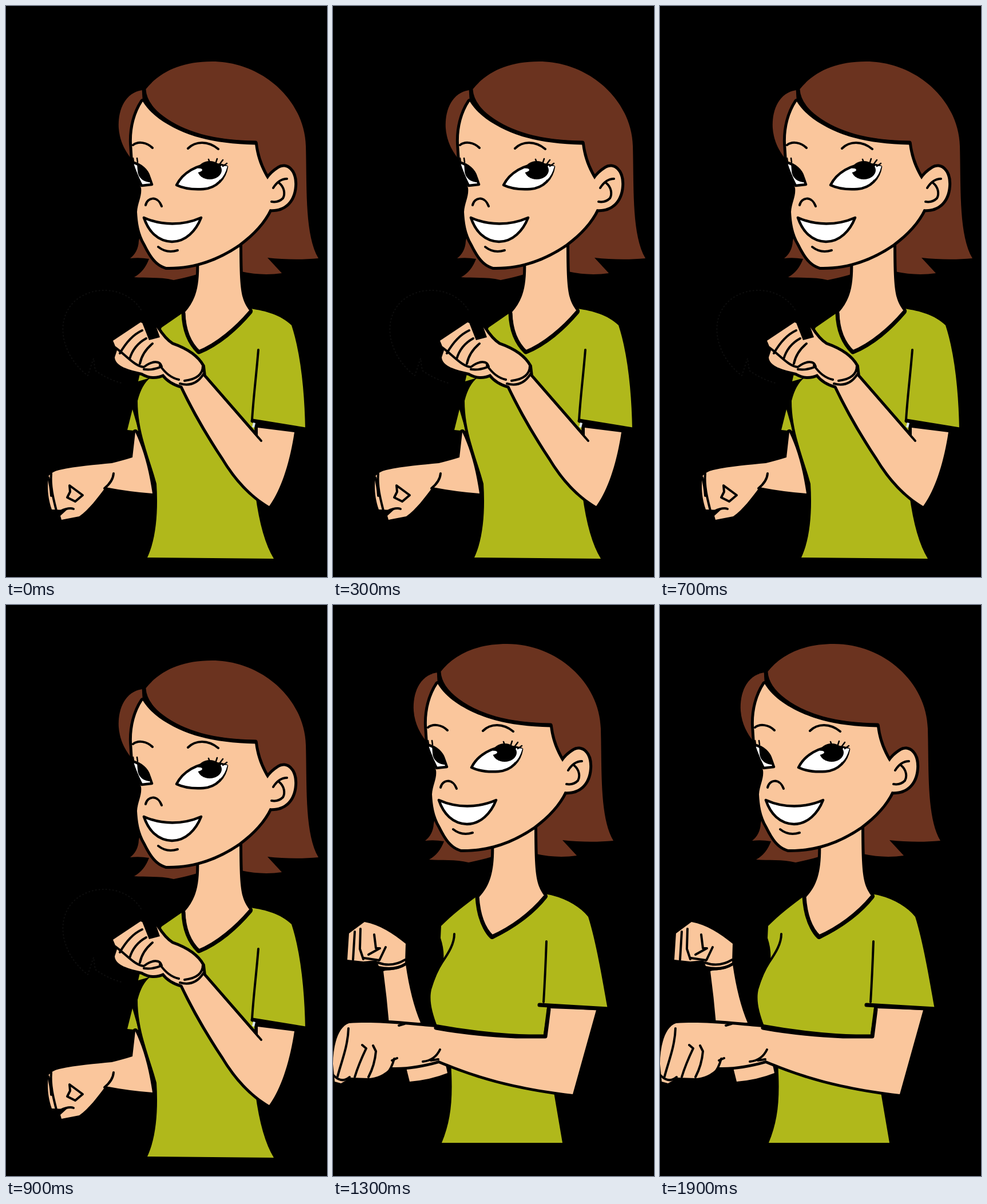
These frames come from a looping animation (561x998 px, 2 s). An HTML page:

```html
<!DOCTYPE html>
<html lang="en">
<head>
<meta charset="utf-8">
<title>Two poses</title>
<style>
  html, body { margin: 0; width: 100%; height: 100%; overflow: hidden; background: #000; }
  svg { display: block; width: 100%; height: 100%; }
  path, ellipse { stroke-linecap: round; stroke-linejoin: round; }
  .skin, .hair, .shirt { stroke: #000; stroke-width: 10; paint-order: stroke; }
  .skin { fill: #fac69c; }
  .hair { fill: #6b331f; }
  .shirt { fill: #b0b81b; }
  .white { fill: #fff; stroke: #000; stroke-width: 4.5; }
  .line { fill: none; stroke: #000; stroke-width: 4; }
  .bold { stroke-width: 7; }
  .thin { stroke-width: 2.5; }
  .faint { fill: none; stroke: #0e0e0e; stroke-width: 2; stroke-dasharray: 1 5; }
</style>
</head>
<body>
<svg viewBox="0 0 561 998">
  <defs>
    <g id="backHair">
      <path class="hair" d="M238 147C206 152 195 185 197 214C199 238 209 254 218 266L230 240L239 168Z"/>
      <path class="hair" d="M243 147C267 116 305 97 360 97C447 97 522 164 524 245C526 320 522 400 546 441C515 444 485 443 457 440Q470 454 482 467Q447 472 411 464L405 300L250 330L232 411Q231 430 217 441Q233 439 250 442Q242 464 224 474C245 476 270 473 293 479Q318 474 337 468L400 420L300 300L246 200Z"/>
    </g>
    <g id="face">
      <path class="skin" d="M239 167C225 188 219 215 220 240L222 272C225 286 231 302 236 318C238 332 230 344 229 360C230 377 232 397 244 417C255 439 264 451 280 456C330 457 370 441 407 416C432 397 450 378 461 355C484 357 502 343 504 315C506 287 489 276 477 284Q464 292 457 303C446 285 438 266 435 241C390 240 350 234 320 224C285 211 256 194 239 167Z"/>
      <path class="line bold" d="M241 146C243 184 293 214 340 227Q380 238 436 239"/>
      <path class="line" d="M222 243C231 236 246 238 256 248M318 249C331 236 353 235 371 250"/>
      <path class="white" d="M220 273C237 277 247 288 250 298L255 312L237 314Q227 295 220 273Z"/>
      <path d="M229 275C243 280 249 293 255 308C243 309 231 302 230 288Z"/>
      <path class="line thin" d="M223 272L222 266M230 273L229 266"/>
      <path class="white" d="M298 313C309 291 335 276 360 277Q379 277 386 281C383 301 369 318 345 320Q317 322 298 313Z"/>
      <path fill="#fff" d="M376 279L387 280Q383 296 374 304Z"/>
      <ellipse cx="356" cy="287" rx="21" ry="16"/>
      <path fill="#fff" d="M334 284Q343 283 343 287Q341 290 334 291Z"/>
      <path class="line thin" d="M357 276L354 268M366 276L369 267M373 277L379 269M379 280L386 275"/>
      <path class="line" d="M244 348C247 334 265 331 272 350"/>
      <path class="white" d="M241 370C272 384 309 384 341 370C332 393 314 412 290 412C265 411 249 394 241 370Z"/>
      <path class="line" d="M266 421Q281 433 300 427M467 318Q477 302 491 302M477 309C487 317 488 329 484 336Q476 344 464 342"/>
    </g>
  </defs>

  <g id="poseA">
    <path class="faint" d="M236 531C213 493 155 485 120 516C83 551 99 613 143 646L153 616L156 637Q178 653 205 660"/>
    <use href="#backHair"/>
    <path class="shirt" d="M221 705L212 741L232 743Z"/>
    <path class="skin" d="M226 745C240 774 250 810 256 852Q215 849 174 841C160 860 145 880 128 892L97 898L95 891L106 881L80 880C73 860 72 842 74 822Q80 814 93 811C125 804 155 802 185 799Q205 794 221 789Z"/>
    <path class="line" d="M79 817C77 840 83 862 88 882M74 824Q78 839 79 856M111 838L134 855L121 866L107 859L112 849ZM95 883Q110 876 118 879M188 817Q187 831 172 843"/>
    <path class="shirt" d="M311 535L427 529C455 533 480 540 499 558C516 610 522 680 523 740L434 725L436 855Q446 930 468 966L247 964C263 930 266 880 263 835C251 790 230 745 230 690Q237 662 252 650L231 656L234 643L272 562Z"/>
    <path class="skin" d="M337 440C339 490 332 513 313 535C314 565 322 588 337 603C370 590 403 562 426 533C411 513 408 500 408 410Z"/>
    <path class="line bold" d="M310 537C311 567 321 590 337 605C370 592 404 562 427 535"/>
    <path class="line" d="M441 601C437 650 432 688 430 724"/>
    <path class="line bold" d="M431 725L523 740"/>
    <use href="#face"/>
    <path class="skin" d="M187 585L235 553L263 562Q277 584 290 592Q330 606 343 630L345 647L440 756L440 737L504 745C495 805 478 850 460 874C428 855 401 825 380 790C352 748 325 700 308 664Q286 658 275 643Q256 652 238 641C215 636 191 630 190 614L194 602Z"/>
    <path class="line" d="M345 643L446 760"/>
    <path fill="#dce7ef" d="M432 728L436 729L434 737L430 736Z"/>
    <path d="M235 546L257 545L269 579L250 584Z"/>
    <path class="line" d="M199 607Q216 577 238 567M216 617Q223 593 245 581M234 625Q238 605 256 590M188 595C207 607 224 630 241 631C255 620 269 619 272 630Q258 637 241 635M269 628Q283 649 302 653M344 629Q344 651 312 655M304 660Q329 667 344 645"/>
  </g>

  <g id="poseB">
    <use href="#backHair" x="-56" y="-29"/>
    <path class="skin" d="M88 640Q94 685 98 732L153 730Q136 690 127 628Z"/>
    <path class="skin" d="M25 620L28 574L55 554C82 559 105 574 127 592L126 625Q108 637 80 631L76 621L53 623Z"/>
    <path class="line" d="M38 571L35 620M48 566L47 601L53 619M72 576L75 600L82 600L62 611M54 617L81 621L92 598M78 625Q103 634 126 620M88 637Q111 637 126 628"/>
    <path class="skin" d="M127 805L134 833Q170 830 200 818L194 790Z"/>
    <path class="shirt" d="M253 508L370 505C402 510 430 525 446 545C460 590 470 650 480 706L374 699L372 780L386 852L401 940L190 940C207 900 210 860 206 800L183 738C172 710 168 690 172 672Q180 645 193 622Q195 603 188 582L189 561C210 540 230 525 253 508Z"/>
    <path class="line" d="M212 575C212 592 202 608 191 624Q179 643 171 666"/>
    <path class="skin" d="M281 410C283 462 276 489 255 511C257 540 264 565 278 579C312 562 346 540 370 509C355 488 352 475 352 380Z"/>
    <path class="line bold" d="M252 510C254 540 262 565 278 580C312 565 346 540 370 511"/>
    <use href="#face" x="-56" y="-29"/>
    <path class="skin" d="M372 757C305 756 240 749 180 738C145 735 75 727 28 731C9 737 0 770 0 802L3 833L14 836L31 826L61 827Q83 827 102 808C130 809 160 803 185 796C245 821 310 842 419 855L460 708L380 705Z"/>
    <path class="line bold" d="M361 699L480 706M377 707L371 754L320 754Q240 750 180 739"/>
    <path class="line" d="M373 588Q371 645 368 694M27 740C26 772 14 800 8 824M51 769L58 775Q45 802 38 825M70 770L75 780Q73 804 62 825M107 793Q102 811 94 819M103 796L112 792M1 822Q15 837 29 825M187 777Q178 796 157 798M171 796L184 794M115 735L125 732"/>
  </g>
</svg>
<script>
  const LOOP = 2000;
  const poseA = document.getElementById('poseA');
  const poseB = document.getElementById('poseB');

  function draw() {
    const first = performance.now() % LOOP < LOOP / 2;
    poseA.style.display = first ? '' : 'none';
    poseB.style.display = first ? 'none' : '';
    requestAnimationFrame(draw);
  }
  draw();
</script>
</body>
</html>
```
